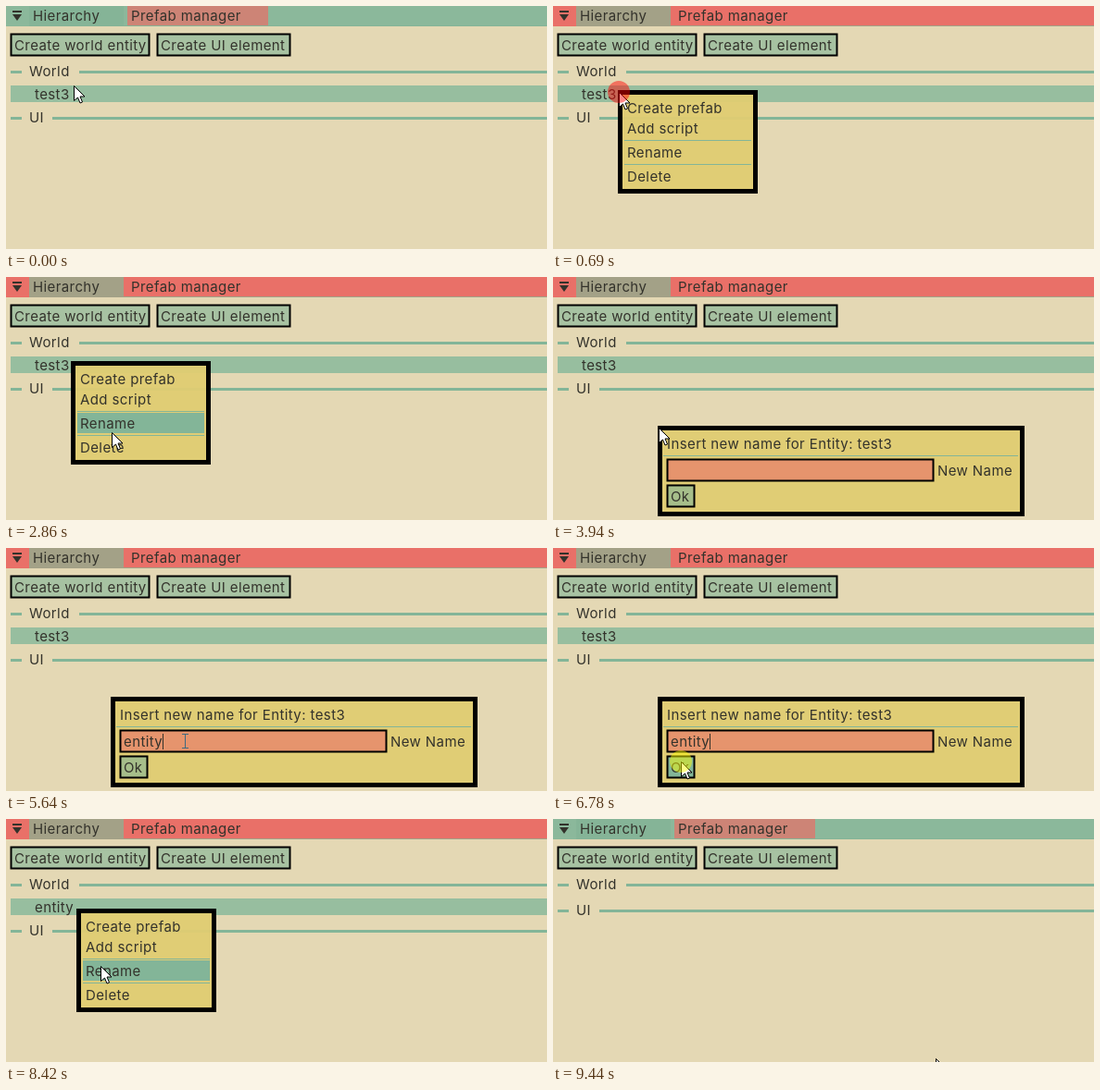
Animation, 584 px wide and 263 px high, one loop 9.51 s. Source, as an HTML page with a canvas:

```html
<!DOCTYPE html>
<html lang="en">
<head>
<meta charset="utf-8">
<title>Entity hierarchy</title>
<style>
  html, body { margin: 0; height: 100%; overflow: hidden; background: #e4d8b4; }
  canvas { display: block; }
</style>
</head>
<body>
<canvas id="stage" width="584" height="263"></canvas>
<script>
const ctx = document.getElementById('stage').getContext('2d');
const LOOP = 9510, TICK = LOOP / 140;
const GREEN = '#83b598', TAN = '#e4d8b4', INK = '#33322b';
const BUTTON = 'rgba(131,181,152,.62)', PANEL = 'rgba(224,205,114,.95)';
const LINE = 18, GAP = 4;

// Pointer moves: start, duration, x, y
const moves = [
  [0, 130, 71, 93],
  [755, 540, 110, 110],
  [1565, 270, 112, 127],
  [2035, 400, 113, 155],
  [2592, 260, 114, 168],
  [2900, 700, 114, 163],
  [3941, 480, 193, 209],
  [6300, 340, 138, 231],
  [7064, 540, 77, 99],
  [8220, 600, 112, 184],
  [9100, 340, 413, 259]
];
const leftClicks = [3810, 4430, 6710, 9030], rightClicks = [350, 7880];
const menuEntries = ['Create prefab', 'Add script', '', 'Rename', '', 'Delete'];

const within = (v, from, to) => v >= from && v < to;
const clamp = v => Math.min(1, Math.max(0, v));
const easeOut = k => 1 - (1 - k) ** 3;

function pointerAt(time) {
  const t = Math.floor((time + 5) / TICK) * TICK;
  let x = 73, y = 86;
  for (const [start, duration, toX, toY] of moves) {
    const k = easeOut(clamp((t - start) / duration));
    x += (toX - x) * k;
    y += (toY - y) * k;
  }
  // Overshoot to the last entry while choosing one
  if (within(t, 2900, 3600)) y += 14 * Math.sin((t - 2900) / 700 * Math.PI);
  return [Math.round(x), Math.round(y)];
}

function rect(x, y, w, h, color) {
  ctx.fillStyle = color;
  ctx.fillRect(x, y, w, h);
}

function text(label, x, baseline) {
  ctx.fillStyle = INK;
  ctx.fillText(label, x, baseline);
}

function outline(x, y, w, h, width) {
  ctx.strokeStyle = '#000';
  ctx.lineWidth = width;
  ctx.strokeRect(x + .5, y + .5, w - 1, h - 1);
}

function panel(x, y, w, h) {
  rect(x + 2, y + 2, w - 4, h - 4, PANEL);
  outline(x + 2, y + 2, w - 4, h - 4, 5);
}

function field(x, y, w, fill, label) {
  rect(x, y, w, LINE + 6, fill);
  outline(x, y, w, LINE + 6, 2);
  text(label, x + 4, y + LINE);
}

function polygon(points) {
  ctx.beginPath();
  points.forEach(([x, y]) => ctx.lineTo(x, y));
  ctx.closePath();
}

function section(label, y) {
  const lineStart = label === 'UI' ? 50 : 79;
  rect(5, y, 12, 3, GREEN);
  rect(lineStart, y, 584 - lineStart, 3, GREEN);
  text(label, 25, y + 6);
}

function titleBar(focused) {
  const active = focused ? '#a3a187' : '#85b497';
  rect(0, 0, 584, 22, focused ? '#e97068' : '#8bb89b');
  if (!focused) rect(131, 0, 152, 22, '#cd8476');
  rect(25, 0, 102, 22, active);
  rect(25, 21, 559, 1, active);
  rect(7, 5, 10, 2, INK);
  polygon([[7, 9], [17, 9], [12, 16]]);
  ctx.fill();
  text('Hierarchy', 29, 16);
  text('Prefab manager', 135, 16);
}

function contextMenu(left, top, px, py) {
  panel(left, top, 151, 112);
  const x = left + 7, width = 137, pitch = LINE + GAP;
  let y = top + 8;
  for (const label of menuEntries) {
    if (!label) {
      rect(x, y + 2, width, 1, GREEN);
      y += GAP;
      continue;
    }
    if (within(px, x, x + width) && within(py, y, y + pitch)) rect(x, y, width, pitch, GREEN);
    text(label, x + 3, y + 17);
    y += pitch;
  }
}

function renameDialog(t, px, py) {
  panel(113, 161, 396, 98);
  text('Insert new name for Entity: test3', 123, 186);
  rect(119, 193, 383, 1, GREEN);
  const typed = 'entity'.slice(0, Math.round(6 * clamp((t - 5125) / 515)));
  field(123, 197, 288, '#e6946d', typed);
  if (t >= 4500) rect(127 + Math.floor(ctx.measureText(typed).width), 201, 1, 17, INK);
  text('New Name', 415, 215);
  const hovered = within(px, 123, 153) && within(py, 225, 249);
  field(123, 225, 30, hovered ? GREEN : BUTTON, 'Ok');
}

function arrow(x, y) {
  ctx.save();
  ctx.translate(x + .5, y + .5);
  polygon([[0, 0], [0, 16], [4, 12.5], [6.5, 18.5], [9, 17.5], [6.5, 11.5], [11.5, 11.5]]);
  ctx.fillStyle = '#fff';
  ctx.fill();
  ctx.strokeStyle = '#000';
  ctx.lineWidth = 1;
  ctx.stroke();
  ctx.restore();
}

function textCursor(x, y) {
  const color = '#3f6a80';
  rect(x, y - 8, 1, 16, color);
  for (const end of [y - 8, y + 7]) rect(x - 3, end, 7, 1, color);
}

function clickMark(clicks, length, color, t, x, y) {
  if (!clicks.some(start => within(t, start, start + length))) return;
  ctx.fillStyle = color;
  ctx.beginPath();
  ctx.arc(x, y, 12, 0, 2 * Math.PI);
  ctx.fill();
}

function draw(t) {
  const [px, py] = pointerAt(t);
  const firstMenu = within(t, 620, 3940), secondMenu = within(t, 8080, 9170);
  const dialog = within(t, 3940, 6850);
  const focused = firstMenu || dialog || secondMenu;
  const exists = t < 9170;

  rect(0, 0, 584, 263, TAN);
  titleBar(focused);
  field(5, 30, 150, BUTTON, 'Create world entity');
  field(163, 30, 144, BUTTON, 'Create UI element');
  section('World', 70);
  if (exists) {
    const hovered = !focused && within(py, 87, 104);
    rect(5, 86, 579, LINE, hovered ? GREEN : '#97be9f');
    text(t < 6850 ? 'test3' : 'entity', 31, 101);
  }
  section('UI', exists ? 120 : 98);

  if (firstMenu) contextMenu(70, 91, px, py);
  if (secondMenu) contextMenu(76, 97, px, py);
  if (dialog) renameDialog(t, px, py);

  const overInput = dialog && within(px, 123, 411) && within(py, 197, 221);
  (overInput ? textCursor : arrow)(px, py);
  clickMark(leftClicks, 130, 'rgba(255,255,0,.47)', t, px, py);
  clickMark(rightClicks, 400, 'rgba(255,0,0,.47)', t, px, py);
}

ctx.font = '15px Inter, sans-serif';
ctx.letterSpacing = '0.4px';

function tick() {
  draw(performance.now() % LOOP);
  requestAnimationFrame(tick);
}
tick();
</script>
</body>
</html>
```
